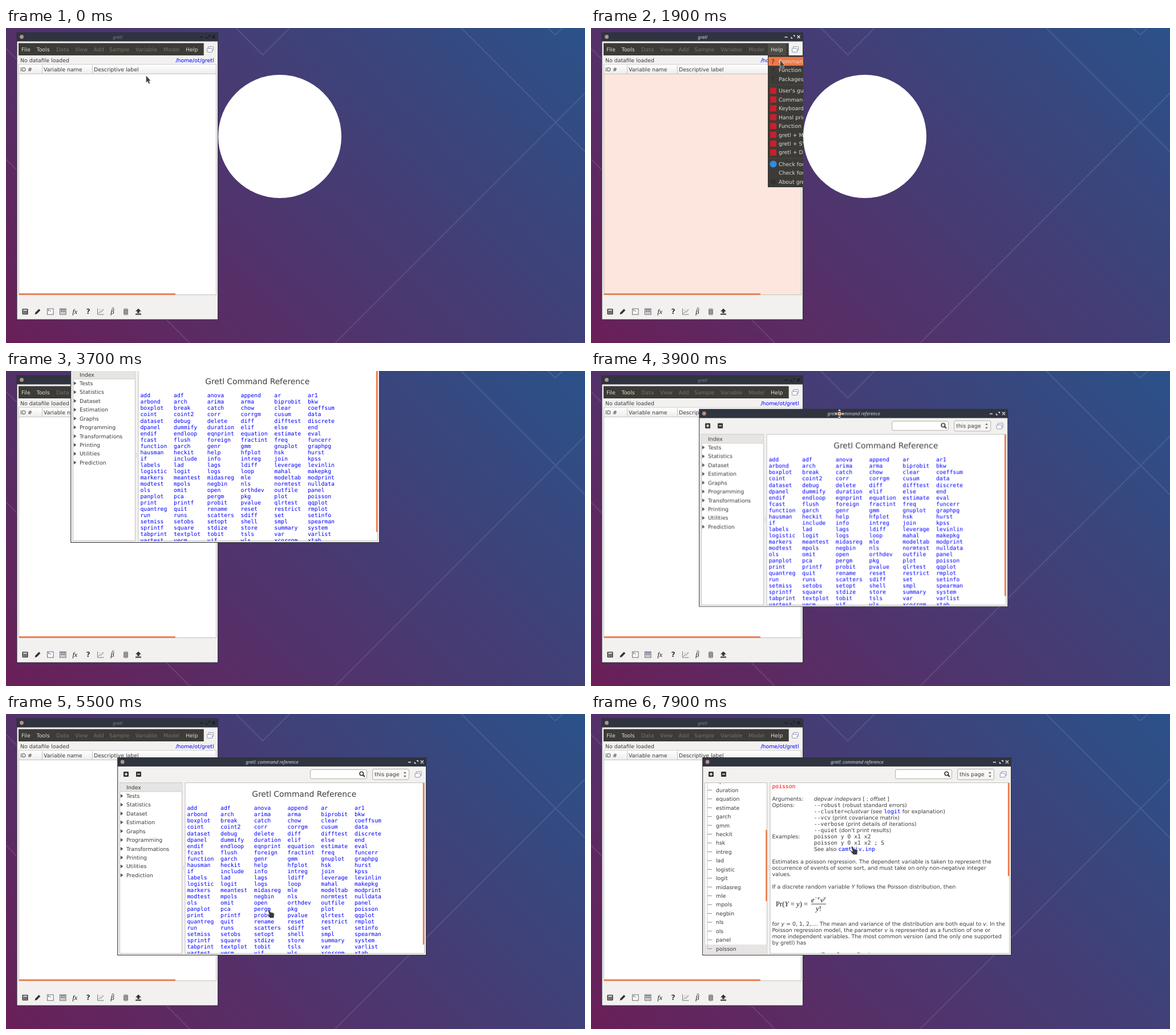
Recreate the animation shown at these times as an HTML page. Size 1015x552 px, loop 8 s.

```html
<!DOCTYPE html>
<html lang="en">
<head>
<meta charset="utf-8">
<title>Command reference</title>
<style>
html, body { margin: 0; width: 100%; height: 100%; overflow: hidden; background: #4d3972; }
svg { display: block; width: 100vw; height: 100vh; }
text { font: 9.4px 'DejaVu Sans', sans-serif; fill: #3c3c3c; text-rendering: geometricPrecision; }
.doc { font-size: 9.45px; }
.mono { font: 9.75px 'DejaVu Sans Mono', monospace; }
.link { fill: #00f; }
.red { fill: #f00; }
.heading { font-size: 13.8px; }
.title { font: italic 8.1px 'Noto Sans', sans-serif; fill: #d8dbe0; text-anchor: middle; }
.on { fill: #dfdbd2; }
.off { fill: #74726c; }
.math { font: 12.7px 'Liberation Serif', serif; fill: #111; }
.it { font-style: italic; }
</style>
</head>
<body>
<svg id="stage" viewBox="0 0 1015 552" preserveAspectRatio="none"></svg>
<script>
const LOOP = 8000, ROW = 15.44, LINE = 11.03;
const ORANGE = '#ef7847', DARK = '#3c3b37', FACE = '#f2f1f0', INK = '#333';

const box = (x, y, w, h, fill, more = '') =>
  `<rect x="${x}" y="${y}" width="${w}" height="${h}" fill="${fill}" ${more}/>`;
const disc = (x, y, r, fill, more = '') => `<circle cx="${x}" cy="${y}" r="${r}" fill="${fill}" ${more}/>`;
const line = (d, color, width = 1, more = '') =>
  `<path d="${d}" fill="none" stroke="${color}" stroke-width="${width}" ${more}/>`;
const shape = (d, fill, more = '') => `<path d="${d}" fill="${fill}" ${more}/>`;
const text = (x, y, s, cls = '', more = '') => `<text x="${x}" y="${y}" class="${cls}" ${more}>${s}</text>`;
const group = (id, ...parts) => `<g id="${id}">${parts.join('')}</g>`;
const clip = (name, ...parts) => `<g clip-path="url(#${name})">${parts.join('')}</g>`;
const span = (cls, s) => `<tspan class="${cls}">${s}</tspan>`;
const mono = s => span('mono', s), link = s => span('mono link', s), it = s => span('it', s);
const border = 'stroke="#c4c1bc"';

const windowsIcon = (x, y) =>
  box(x - 3.5, y - 5, 9, 7, '#fff', 'rx="1" stroke="#7c84a4" stroke-width=".9"') +
  box(x - 5.5, y - 2, 9, 6.8, '#fff', 'rx="1" stroke="#7c84a4" stroke-width=".9"');

const titleButtons = (x, y, color = '#f0f1f3') =>
  line(`M${x - 24.5} ${y + .5}h5M${x - 2.5} ${y - 2.5}l5 5m0-5l-5 5`, color, 1.4) +
  shape(`M${x - 10} ${y - 3}h3.5v3.5zM${x - 13.5} ${y - .5}v3.5h3.5z`, color);

const frame = (x, y, w, h) =>
  box(x, y, w, h, FACE, 'stroke="#2b2f39"') + box(x, y, w, 15.5, '#2f343f') +
  disc(x + 8.5, y + 7.5, 3.4, '#b98f8a');

function desktop() {
  const rays = 'M577 552L1015 114M798 0L1015 217M403 0L450 47L497 0M950 0L963 12L976 0M0 36L20 56M0 230L322 552';
  return box(0, 0, 1015, 552, 'url(#sky)') + line(rays, 'rgba(255,255,255,.1)', 2) +
    disc(480, 190, 108, '#fff');
}

function toolbar() {
  const y = 497;
  return box(28.5, y - 5, 10, 10, INK, 'rx="1"') + box(30, y - 3.5, 7, 2, '#fff') +
    line(`M30 ${y + .5}h7M30 ${y + 3}h7`, '#fff', 1.3, 'stroke-dasharray="1.4 1.2"') +
    shape('M50.5 502l1-3.6 6.2-6.2 2.6 2.6-6.2 6.2z', INK) +
    box(72.5, y - 5, 10.5, 10, '#fff', 'stroke="#666"') + line('M74 493.5l2 1.2-2 1.2M77 496h2', INK, .9) +
    box(94.5, y - 5, 10.5, 10, '#fff', 'stroke="#555"') +
    line('M96 494.2h8M96 496.8h8', '#335', 1.8, 'stroke-dasharray="2 .8"') + line('M96 499.6h8', '#99a', 1.2) +
    text(116.5, 500.5, 'fx', 'math it', 'style="font-size:12px"') +
    text(140.5, 501.3, '?', '', 'style="font-size:12.5px;font-weight:bold"') +
    line('M160.5 491.5v10.5h11M162 500l3-3 2 1 4-5', '#777', 1) + line('M163 494h8', '#777', 1, 'stroke-dasharray="1 2"') +
    text(183.6, 501, 'β', 'math it', 'style="font-size:12px"') + line('M185.5 491.6l2-1.6 2 1.6', INK, .9) +
    box(206.5, y - 5, 7, 10.5, '#bbb', 'rx="1.5" stroke="#666" stroke-width=".7"') +
    line('M206.5 494.5h7M206.5 497.3h7M206.5 500h7', '#444', .9) +
    shape('M232 491.5l5 5h-3.2v3h-3.6v-3H227zM227 500.5h10v2h-10z', INK);
}

function mainWindow() {
  const menus = [['File', 27, 1], ['Tools', 53.5, 1], ['Data', 88], ['View', 121], ['Add', 153.5],
    ['Sample', 181], ['Variable', 227], ['Model', 276], ['Help', 315, 1]];
  return frame(19, 8, 352.5, 503) +
    group('mainTitle', text(195.5, 18.6, 'gretl', 'title')) +
    titleButtons(364, 15.5, '#171a20') + group('mainButtons', titleButtons(364, 15.5)) +
    box(22, 26.5, 324.7, 21.5, DARK) + box(310, 27, 32, 21, '#4c4b46', 'id="helpLit"') +
    menus.map(([s, x, on]) => text(x, 40.7, s, on ? 'on' : 'off')).join('') +
    windowsIcon(358, 37.5) +
    text(25, 60.4, 'No datafile loaded') + text(364.5, 60.4, '/home/ot/gretl', 'link', 'text-anchor="end"') +
    box(22.5, 64, 346, 403.5, '#fff', border) + box(23, 81, 345, 386, '#fde6de', 'id="pink"') +
    box(23, 64.5, 345, 16, 'url(#header)') + line('M23 80.5h345M63.5 65v15M151.5 65v15', '#c9c6c2') +
    text(25, 75.8, 'ID #') + text(66, 75.8, 'Variable name') + text(154, 75.8, 'Descriptive label') +
    box(23, 465, 274, 2.6, ORANGE) + toolbar();
}

function helpMenu() {
  const items = ['Command reference', 'Function reference', 'Packages', "User's guide", 'Command reference',
    'Keyboard shortcuts', 'Hansl primer', 'Function package guide', 'gretl + MPI', 'gretl + SVM',
    'gretl + DB.NOMICS', 'Check for updates', 'Check for addons', 'About gretl'];
  const mid = i => 58.5 + i * ROW + (i > 2) * 5.1 + (i > 10) * 5.1;
  const icon = i => i < 3 ? text(316, mid(i) + 4, '?', '', 'style="font-size:11px;fill:#2d2c29"')
    : i < 11 ? box(314, mid(i) - 5.5, 11, 11, '#c8202a')
    : i === 11 ? disc(319.5, mid(i), 6, '#2f8de4')
    : i === 13 ? disc(319.5, mid(i), 4.5, '#34332f') : '';
  return box(310.5, 48.5, 193, 230, DARK, 'stroke="#32312d"') +
    box(311, 50.7, 192, 15.4, ORANGE, 'id="lit"') +
    line('M311 99.5h192M311 228.5h192', '#4a4944') +
    items.map((s, i) => icon(i) + text(329, mid(i) + 3.4, s, 'on')).join('') +
    text(497.5, 61.9, 'Ctrl+H', '', 'text-anchor="end" style="fill:#a5a198"');
}

const commands = `add adf anova append ar ar1 arbond arch arima arma biprobit bkw
boxplot break catch chow clear coeffsum coint coint2 corr corrgm cusum data
dataset debug delete diff difftest discrete dpanel dummify duration elif else end
endif endloop eqnprint equation estimate eval fcast flush foreign fractint freq funcerr
function garch genr gmm gnuplot graphpg hausman heckit help hfplot hsk hurst
if include info intreg join kpss labels lad lags ldiff leverage levinlin
logistic logit logs loop mahal makepkg markers meantest midasreg mle modeltab modprint
modtest mpols negbin nls normtest nulldata ols omit open orthdev outfile panel
panplot pca pergm pkg plot poisson print printf probit pvalue qlrtest qqplot
quantreg quit rename reset restrict rmplot run runs scatters sdiff set setinfo
setmiss setobs setopt shell smpl spearman sprintf square stdize store summary system
tabprint textplot tobit tsls var varlist vartest vecm vif wls xcorrgm xtab`.split(/\s+/);

function indexPage() {
  const topics = 'Index Tests Statistics Dataset Estimation Graphs Programming Transformations Printing Utilities Prediction';
  const side = topics.split(' ').map((s, i) => {
    const y = 128.1 + i * ROW;
    return (i ? shape(`M200.8 ${y - 3.3}l4.6 3.3-4.6 3.3z`, '#555') : '') + text(211, y + 3.4, s);
  }).join('');
  const links = commands.map((s, i) =>
    text(317.4 + i % 6 * 58.72, 168.4 + Math.floor(i / 6) * LINE, s, 'mono link')).join('');
  return group('indexPage',
    box(199.5, 120.8, 109, 15.2, '#e7e5e3') + line('M199.5 136h109', '#cfccc8'), side,
    clip('pane', text(431.2, 144.9, 'Gretl Command Reference', 'heading'), links),
    box(730.8, 121, 2.4, 283, ORANGE));
}

function poissonPage() {
  const names = 'dpanel duration equation estimate garch gmm heckit hsk intreg lad logistic logit midasreg mle mpols negbin nls ols panel poisson';
  const side = names.split(' ').map((s, i) => {
    const y = 117.9 + i * ROW;
    return line(`M204 ${y}h8`, '#8c8c8c') + text(219, y + 3.4, s);
  }).join('');
  const at = (row, x, s) => text(x, 129.5 + row * LINE, s, 'doc');
  const options = [
    `${it('depvar indepvars')} [ ; ${it('offset')} ]`,
    `${mono('--robust')} (robust standard errors)`,
    `${mono('--cluster=')}${it('clustvar')} (see ${link('logit')} for explanation)`,
    `${mono('--vcv')} (print covariance matrix)`,
    `${mono('--verbose')} (print details of iterations)`,
    `${mono('--quiet')} (don't print results)`,
    mono('poisson y 0 x1 x2'), mono('poisson y 0 x1 x2 ; S'),
    `See also ${link('camtriv.inp')}`];
  const prose = [[12, 'Estimates a poisson regression. The dependent variable is taken to represent the'],
    [13, 'occurrence of events of some sort, and must take on only non-negative integer'], [14, 'values.'],
    [16, `If a discrete random variable ${it('Y')} follows the Poisson distribution, then`],
    [21.86, `for ${it('y')} = 0, 1, 2,.... The mean and variance of the distribution are both equal to ${it('v')}. In the`],
    [22.86, `Poisson regression model, the parameter ${it('v')} is represented as a function of one or`],
    [23.86, 'more independent variables. The most common version (and the only one supported'],
    [24.86, 'by gretl) has']];
  const small = 'style="font-size:9px"';
  const formula = text(324, 337, `Pr(${it('Y')} = ${it('y')}) =`, 'math') + line('M386 333h26', '#111', .8) +
    text(386, 329.8, 'e', 'math it') + text(391.3, 325.2, '−ν', 'math it', small) +
    text(402, 329.8, 'ν', 'math it') + text(407.8, 325.2, 'y', 'math it', small) +
    text(394, 345, `${it('y')}!`, 'math');
  return group('poissonPage',
    box(199.5, 404, 109, 15.5, '#e7e5e3'),
    clip('side', line('M204 120v291', '#c6c6c6'), side),
    box(306.2, 203, 2.4, 125, ORANGE),
    clip('pane', text(317.4, 129.6, 'poisson', 'mono red'),
      at(2, 317.4, 'Arguments:'), at(3, 317.4, 'Options:'), at(8, 317.4, 'Examples:'),
      options.map((s, i) => at(i + 2, 390.8, s)).join(''),
      prose.map(([row, s]) => at(row, 317.4, s)).join(''), formula,
      text(361, 427, 'v = exp(β₀ + β₁x₁ + β₂x₂)', 'math it')),
    box(730.8, 121, 2.4, 163, ORANGE));
}

function helpWindow() {
  const fold = (x, d) => box(x - 4.5, 101, 9, 9, INK, 'rx="1.2"') + line(d, '#fff', 1.5);
  return group('help',
    frame(195.7, 76.5, 540.8, 346),
    text(466.5, 87, 'gretl: command reference', 'title'), titleButtons(729.3, 84),
    fold(210.5, 'M208 105.5h5m-2.5-2.5v5'), fold(232.5, 'M230 105.5h5'),
    box(533.5, 97.5, 99, 16, '#fff', 'rx="2.5" stroke="#b3afa9"'),
    disc(623.3, 104.5, 3.2, 'none', `stroke="${INK}" stroke-width="1.6"`), line('M625.7 106.8l3.2 3.2', INK, 2),
    box(642.5, 96.5, 64, 18.5, '#f7f6f5', 'rx="2.5" stroke="#b3afa9"'), text(646, 109, 'this page'),
    shape('M697 104l2.3-2.8 2.3 2.8zM697 108l2.3 2.8 2.3-2.8z', '#555'), windowsIcon(722.7, 106),
    box(199.5, 120.5, 109, 299, '#fff', border), box(314, 120.5, 419.5, 299, '#fff', border),
    line('M311.3 266v9', '#aaa', 1.4, 'stroke-dasharray="1 2"'),
    indexPage(), poissonPage());
}

function pointers() {
  const head = a => shape('M0 -8.5l3.4 4h-6.8z', '#fff', `stroke="${INK}" stroke-width=".9" transform="rotate(${a})"`);
  return group('cursor',
    group('arrow', shape('M.4 0V13L3.2 10.6 5.2 15 7.6 14 5.7 9.7H9Z', '#404040', 'stroke="#e4e4e4" stroke-width=".7"')),
    group('hand', shape('M4 1.2Q5.6 .4 6.4 2L7.6 5.2 12.6 6.4Q14.4 7 14.3 9L13.6 15.5H6.8L2.6 10.6Q2 9 3.8 9L5.4 9.8 3.4 2.6Q3.2 1.6 4 1.2Z', '#3a3a3a', 'stroke="#e8e8e8" stroke-width=".7"')),
    group('move', [0, 90, 180, 270].map(head).join(''), disc(0, 0, 2.8, ORANGE, 'stroke="#fff" stroke-width="1"')));
}

const clipBox = (id, ...b) => `<clipPath id="${id}">${box(...b, '#000', `id="${id}Box"`)}</clipPath>`;
const $ = id => document.getElementById(id);
$('stage').innerHTML = `<defs>
  <linearGradient id="sky" gradientUnits="userSpaceOnUse" x1="0" y1="552" x2="783.5" y2="-231.5">
    <stop stop-color="#6a1f58"/><stop offset="1" stop-color="#2a5289"/></linearGradient>
  <linearGradient id="header" x2="0" y2="1"><stop stop-color="#fff"/><stop offset="1" stop-color="#ececeb"/></linearGradient>
  ${clipBox('side', 199.5, 121, 109, 298.2)}${clipBox('pane', 314.5, 121, 419, 298.2)}${clipBox('open', 310, 48, 195, 232)}
  </defs>` + desktop() + mainWindow() + group('menu', clip('open', helpMenu())) + helpWindow() + pointers();

// Each step is [ms, value] and holds until the next one.
function play(id, prop, steps) {
  const frames = steps.map(([ms, v]) => ({ offset: ms / LOOP, [prop]: v, easing: 'step-end' }));
  frames.push({ offset: 1, [prop]: steps.at(-1)[1] });
  $(id).animate(frames, { duration: LOOP, iterations: Infinity });
}
const show = (id, from, to = LOOP, low = 0) => play(id, 'opacity',
  [[0, from ? low : 1], ...(from ? [[from, 1]] : []), ...(to < LOOP ? [[to, low]] : [])]);
const travel = (id, steps) => play(id, 'transform', steps.map(([ms, x, y]) => [ms, `translate(${x}px, ${y}px)`]));
// One position every 100 ms.
const run = (start, ...points) => points.map(([x, y], i) => [start + i * 100, x, y]);

show('mainTitle', 800, 2000, .45);
show('mainButtons', 800, 2000);
show('pink', 800, 2000);
show('helpLit', 700, 2000);
show('menu', 800, 2000);
show('lit', 1500);
play('openBox', 'width', [[0, '195px'], [1900, '62px']]);
show('help', 2000);
show('indexPage', 0, 6900);
show('poissonPage', 6900);
travel('help', [[0, -134.5, -185.4],
  ...run(3700, [-82, -122], [-28, -48], [-5.9, -9.5], [-2, -3.5], [0, 0])]);

travel('cursor', [[0, 245, 83], [100, 246, 73],
  ...run(300, [258, 63], [278, 52], [298, 44], [313, 39], [321, 37], [324, 36], [325, 36]),
  ...run(1200, [326, 38], [327, 42], [328, 47], [329, 51], [330, 54], [331, 56]),
  [2400, 312, 63], [2500, 297, 68],
  ...run(3700, [359, -38], [413, 36], [435.5, 75], [439, 81], [441, 85], [441, 85], [440, 112], [438, 180], [436, 247]),
  ...run(4600, [456, 290], [474, 342], [462, 378], [428, 381], [392, 366], [366, 351], [357, 345]),
  ...run(5400, [410, 344], [456, 342], [482, 344], [506, 345], [526, 344], [543, 342], [557, 340], [569, 338], [578, 337]),
  ...run(6300, [592, 335], [608, 333], [619, 336], [624, 339]),
  ...run(7200, [606, 328], [570, 308], [524, 282], [482, 259], [450, 243], [438, 236], [445, 233], [453, 231])]);
play('arrow', 'opacity', [[0, 1], [2400, 0], [4300, 1], [4500, 0]]);
play('hand', 'opacity', [[0, 0], [2400, 1], [2900, 0], [4500, 1]]);
play('move', 'opacity', [[0, 0], [3700, 1], [4300, 0]]);
</script>
</body>
</html>
```
